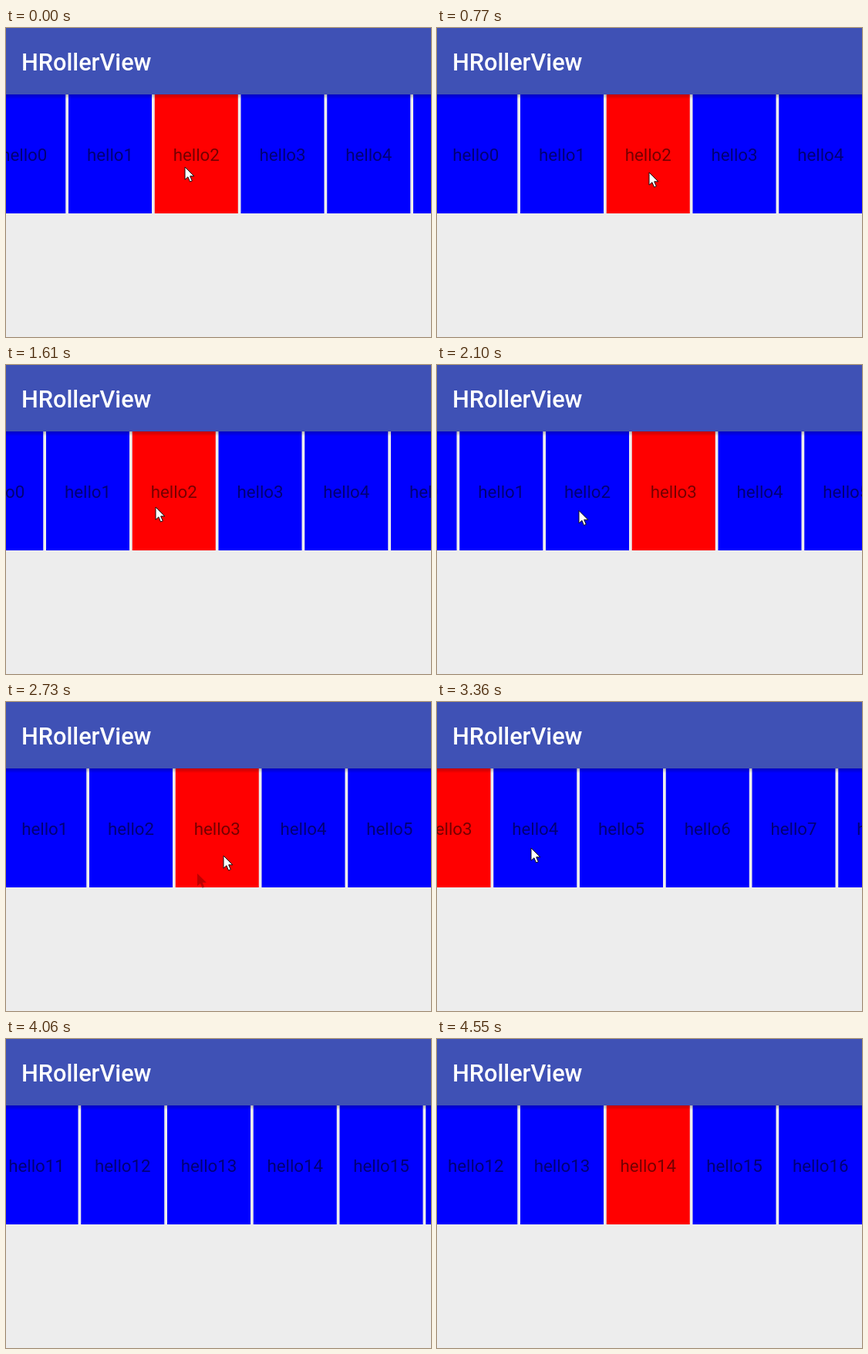
An HTML page that plays this animation: 551x400 px, repeating every 5.95 s.

```html
<!DOCTYPE html>
<html lang="en">
<head>
<meta charset="utf-8">
<title>HRollerView</title>
<style>
  html, body { margin: 0; width: 100%; height: 100%; overflow: hidden; background: #ededed; }
  svg { display: block; width: 551px; height: 400px; }
  text { font-family: Roboto, "Noto Sans", sans-serif; }
  .title { font-size: 30.7px; font-weight: 500; fill: #fff; }
  .tile rect { fill: #00f; }
  .tile.on rect { fill: #f00; }
  .tile text { font-size: 22.3px; text-anchor: middle; fill: #000; fill-opacity: .54; }
</style>
</head>
<body>
<svg viewBox="0 0 551 400">
  <defs>
    <linearGradient id="shade" x1="0" y1="0" x2="0" y2="1">
      <stop offset="0" stop-color="#000" stop-opacity=".24"/>
      <stop offset="1" stop-color="#000" stop-opacity="0"/>
    </linearGradient>
    <path id="arrow" d="M0 0V16.2L3.9 12.8L6.5 19L9.3 17.8L6.7 11.8H11.8Z"/>
  </defs>
  <rect width="551" height="400" fill="#ededed"/>
  <g id="strip"></g>
  <rect y="86" width="551" height="6" fill="url(#shade)"/>
  <rect width="551" height="86" fill="#3f51b5"/>
  <text class="title" x="20" y="55">HRollerView</text>
  <use id="trail" href="#arrow" x="248" y="222" opacity=".26"/>
  <use id="cursor" href="#arrow" fill="#fff" stroke="#111" stroke-width="1"/>
</svg>
<script>
const LOOP = 5950, STEP = 70, PITCH = 111.75;
const NS = "http://www.w3.org/2000/svg";
const $ = id => document.getElementById(id);

// [time, scroll offset]
const scrollKeys = [
  [0, 27], [280, 45], [350, 45], [420, 36], [490, 22], [560, 10], [630, 3], [700, 0],
  [980, 0], [1120, 9], [1610, 56], [1960, 66], [2100, 78.75], [2240, 100],
  [2310, 107], [2380, 110.5], [2450, PITCH], [3080, PITCH], [3150, 132], [3220, 185],
  [3290, 265], [3360, 370], [3430, 520], [3500, 655], [3570, 770], [3640, 872.5],
  [3780, 1035], [3920, 1155], [4060, 1240], [4200, 1293], [4340, 1322],
  [4480, 1338], [4550, 12 * PITCH]
];

// [time, x, y]
const cursorKeys = [
  [0, 232, 180], [280, 214, 183], [420, 214, 184], [770, 275, 187], [980, 250, 184],
  [1120, 241, 184], [1610, 194, 184], [1960, 184, 187], [2240, 184, 190],
  [2450, 184, 228], [2590, 189, 237], [2660, 248, 222], [2730, 282, 199],
  [2870, 350, 186], [3080, 380, 180], [3150, 360, 181], [3220, 307, 183],
  [3290, 227, 186], [3360, 122, 189], [3430, -40, 192]
];

// [time, highlighted item]
const activeKeys = [[0, 2], [1960, 3], [4200, 14]];

function sample(keys, t, col) {
  let i = 0;
  while (i < keys.length - 1 && keys[i + 1][0] <= t) i++;
  const a = keys[i], b = keys[i + 1];
  return b ? a[col] + (b[col] - a[col]) * (t - a[0]) / (b[0] - a[0]) : a[col];
}

function add(parent, name, attrs) {
  const el = document.createElementNS(NS, name);
  for (const key in attrs) el.setAttribute(key, attrs[key]);
  return parent.appendChild(el);
}

const tiles = Array.from({ length: 18 }, (_, i) => {
  const x = i * PITCH - 3.75;
  const tile = add($("strip"), "g", { class: "tile" });
  add(tile, "rect", { x, y: 86, width: 108, height: 154 });
  add(tile, "text", { x: x + 54, y: 172 }).textContent = "hello" + i;
  return tile;
});

function draw(time) {
  const t = Math.floor(time % LOOP / STEP) * STEP;
  const active = activeKeys.filter(k => k[0] <= t).pop()[1];
  $("strip").setAttribute("transform", `translate(${-sample(scrollKeys, t, 1)} 0)`);
  tiles.forEach((tile, i) => tile.classList.toggle("on", i === active));
  $("cursor").setAttribute("transform",
    `translate(${sample(cursorKeys, t, 1)} ${sample(cursorKeys, t, 2)})`);
  $("trail").style.display = t >= 2730 && t < 2870 ? "" : "none";
}

const start = performance.now();
function tick() {
  draw(performance.now() - start);
  requestAnimationFrame(tick);
}
tick();
</script>
</body>
</html>
```
